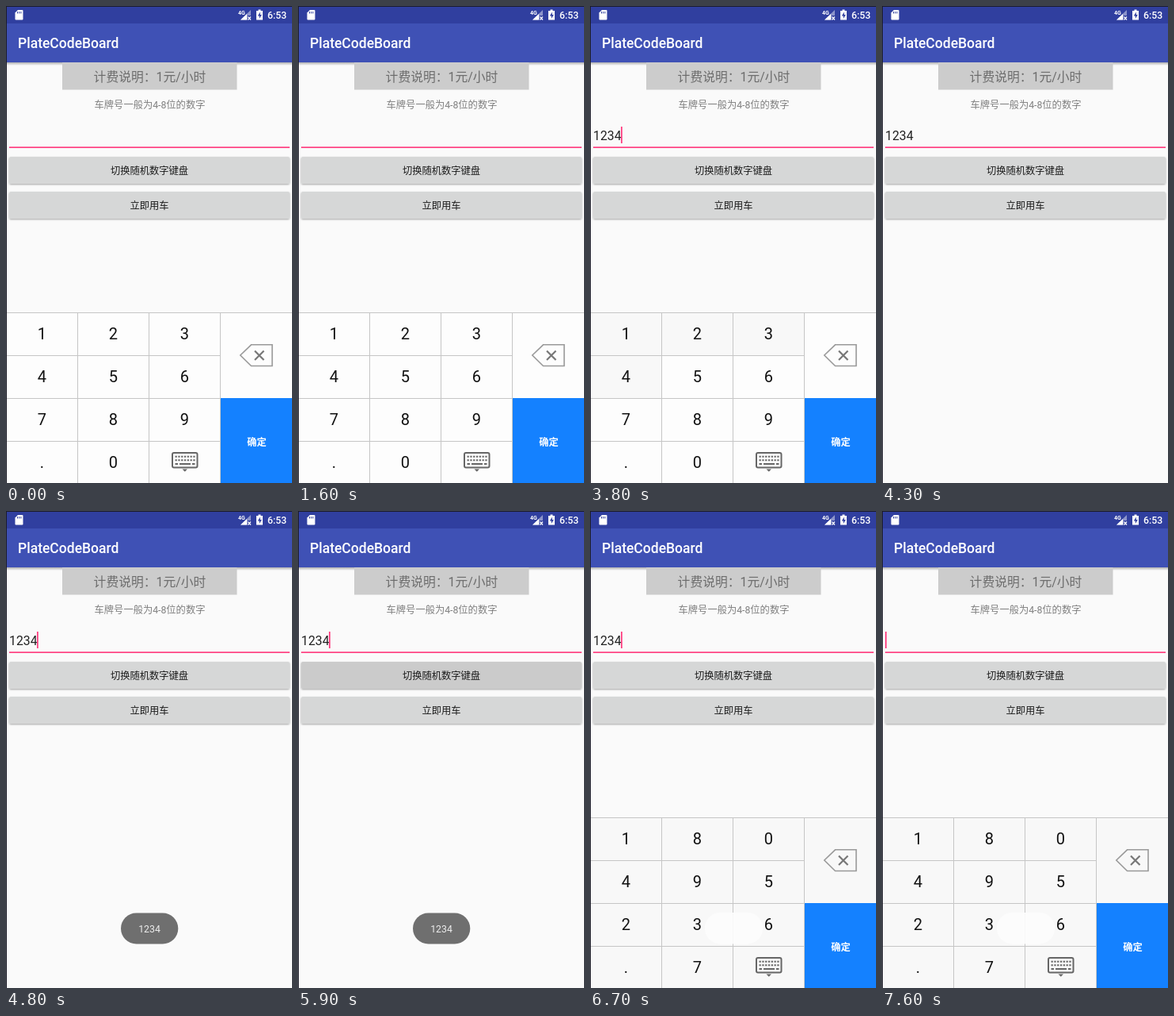
These frames come from a looping animation (361x601 px, 8000 ms). An HTML page:

```html
<!DOCTYPE html>
<html lang="zh-CN">
<head>
<meta charset="utf-8">
<title>PlateCodeBoard</title>
<style>
  html, body { margin: 0; width: 100%; height: 100%; overflow: hidden; background: #fafafa; }
  svg { display: block; }
  text { font-family: Roboto, "Noto Sans CJK SC", "Noto Sans CJK", sans-serif; font-size: 12.27px; }
  .mid { text-anchor: middle; }
  .medium { font-weight: 500; fill: #fff; }
  .digit { font-size: 20px; fill: #111; }
  .large { font-size: 15.8px; }
</style>
</head>
<body>
<svg width="361" height="601" viewBox="0 0 361 601">
  <defs>
    <linearGradient id="shade" x2="0" y2="1">
      <stop stop-opacity=".3"/><stop offset="1" stop-opacity="0"/>
    </linearGradient>
    <filter id="lift" x="-5%" y="-20%" width="110%" height="150%">
      <feDropShadow dx="0" dy="1" stdDeviation=".8" flood-opacity=".35"/>
    </filter>
  </defs>

  <rect width="361" height="601" fill="#fafafa"/>
  <rect y="71" width="361" height="4" fill="url(#shade)"/>
  <rect width="361" height="22" fill="#303f9f"/>
  <rect y="22" width="361" height="49" fill="#3f51b5"/>

  <!-- status bar -->
  <g fill="#fff">
    <path d="M15 5h5.5q1 0 1 1v10.500q0 1-1 1h-8q-1 0-1-1V8.500z"/>
    <path d="M14.500 7v2.500M16.700 7v2.500M18.900 7v2.500" stroke="#303f9f"/>
    <text x="293" y="10.500" style="font-size:7px;font-weight:700">4G</text>
    <path d="M296 17.500L309 5v7h-4v5.500z" opacity=".45"/>
    <path d="M296 17.500L304 10v7.500z"/>
    <path d="M305.500 13.500l3.500 4m0-4l-3.500 4" stroke="#fff" stroke-width="1.200"/>
    <path d="M318.500 4.500h3V6h2.500v11.500h-8V6h2.500z"/>
    <path d="M320.800 7.500l-3 5h2v3.500l3-5h-2z" fill="#303f9f"/>
    <text x="330" y="16" class="medium">6:53</text>
  </g>
  <text x="15" y="53" class="medium" style="font-size:17.5px">PlateCodeBoard</text>

  <rect x="71" y="71" width="220.500" height="34.500" fill="#ccc"/>
  <text x="181.500" y="94.500" class="mid large" fill="#6c6c6c">计费说明：1元/小时</text>
  <text x="181.500" y="128.500" class="mid" fill="#7f7f7f">车牌号一般为4-8位的数字</text>

  <text id="entry" x="4" y="168.500" class="large" fill="#222"></text>
  <rect x="4" y="177.300" width="354" height="1.700" fill="#ff4081"/>
  <rect id="caret" y="152" width="1.800" height="21" fill="#ff4081"/>

  <g fill="#d6d7d7" filter="url(#lift)">
    <rect id="shuffle" x="4" y="190" width="354" height="34" rx="2"/>
    <rect x="4" y="234" width="354" height="34" rx="2"/>
  </g>
  <g class="mid" fill="#1c1c1c">
    <text x="181" y="212">切换随机数字键盘</text>
    <text x="181" y="255.500">立即用车</text>
  </g>

  <g id="keyboard">
    <g id="cells"></g>
    <rect x="271" y="494" width="90" height="107" fill="#1481ff"/>
    <path d="M0 386.500H361M0 440.500H271M0 494.500H271M0 548.500H271M90.500 386V601M180.500 386V601M270.500 386V601" stroke="#c6c6c6"/>
    <g id="digits" class="mid"></g>
    <g id="erase" fill="none">
      <path d="M295.800 440L309.500 426.800H336V453.500H309.500z" stroke="#999" stroke-width="1.600"/>
      <path d="M314 434.500l11.500 11.500m0-11.500l-11.500 11.500" stroke="#777" stroke-width="2.200"/>
    </g>
    <g stroke="#666" fill="none" stroke-width="2">
      <rect x="210" y="563" width="31.500" height="18.500" rx="2"/>
      <path d="M213.500 567.700H239M213.500 572.200H239" stroke-dasharray="2.300 1.500"/>
      <path d="M213.500 577H217M219 577H233M235 577H238.500"/>
      <path d="M222.500 583.500h6.500l-3.200 3.300z" fill="#666" stroke="none"/>
    </g>
    <text x="316.500" y="553.500" class="mid medium" style="font-weight:700">确定</text>
  </g>

  <rect id="ghost" x="145" y="506" width="73" height="39.500" rx="19.500" fill="#fdfdfd" opacity=".9"/>
  <g id="toast">
    <rect x="145" y="506.500" width="72.300" height="39" rx="19.500" fill="#6f6f6f"/>
    <text x="181" y="531" class="mid" fill="#eee">1234</text>
  </g>
  <path d="M0 .5H361M.5 0V601" stroke="#1c1c28" fill="none"/>
</svg>
<script>
  const LOOP = 8000, STEP = 100, DIGIT_WIDTH = 8.87;
  const typeTimes = [2300, 3300, 3500, 3800];
  const eraseTimes = [7300, 7400, 7500, 7600];
  const caretToggles = [300, 700, 1200, 1600, 2100, 2800, 3300, 4300, 4800, 5200, 5600, 6100, 6600, 7000, 7200];
  const presses = [[2100, 2300], [3100, 3300], [3400, 3500], [3700, 3800]];
  const ordered = "123456789.0", shuffled = "180495236.7";

  const $ = id => document.getElementById(id);
  const show = (el, on) => el.style.display = on ? "" : "none";
  const passed = (times, t) => times.filter(x => x <= t).length;
  const within = (t, from, to) => t >= from && t < to;
  const clamp = x => Math.max(0, Math.min(1, x));

  function add(parent, tag, attrs) {
    const el = document.createElementNS("http://www.w3.org/2000/svg", tag);
    for (const name in attrs) el.setAttribute(name, attrs[name]);
    return parent.appendChild(el);
  }

  const cells = [], digits = [];
  for (let i = 0; i < 12; i++) {
    const x = i % 3 * 90, y = 386 + Math.floor(i / 3) * 54;
    cells.push(add($("cells"), "rect", { x, y, width: 91, height: 55 }));
    if (i < 11) digits.push(add($("digits"), "text", { x: x + 45.3, y: y + 34.3, class: "digit" }));
  }
  cells.push(add($("cells"), "rect", { x: 271, y: 386, width: 90, height: 108 }));

  function keyColor(i, t) {
    if (t >= 4300) return "#f8f8f8";
    const [down, up] = presses[i] || [LOOP, LOOP];
    return t < down ? "#fdfdfd" : t < up ? "#e8e8e8" : "#f8f8f8";
  }

  function draw(t) {
    const length = passed(typeTimes, t) - passed(eraseTimes, t);
    $("entry").textContent = "1234".slice(0, length);
    $("caret").setAttribute("x", 4 + length * DIGIT_WIDTH - (length ? .5 : 0));
    show($("caret"), passed(caretToggles, t) % 2);

    $("shuffle").setAttribute("fill", within(t, 5900, 6200) ? "#cbcbcb" : "#d6d7d7");
    show($("keyboard"), !within(t, 4300, 6100));
    cells.forEach((cell, i) => cell.setAttribute("fill", keyColor(i, t)));
    const layout = t < 4300 ? ordered : shuffled;
    digits.forEach((digit, i) => digit.textContent = layout[i]);
    $("erase").setAttribute("opacity", within(t, 7200, 7600) ? .7 : 1);

    $("toast").setAttribute("opacity", clamp((t - 4400) / 400) * clamp((6700 - t) / 300));
    show($("ghost"), t >= 6700);
  }

  function tick() {
    const t = performance.now() % LOOP;
    draw(Math.floor(t / STEP) * STEP);
    requestAnimationFrame(tick);
  }
  tick();
</script>
</body>
</html>
```
